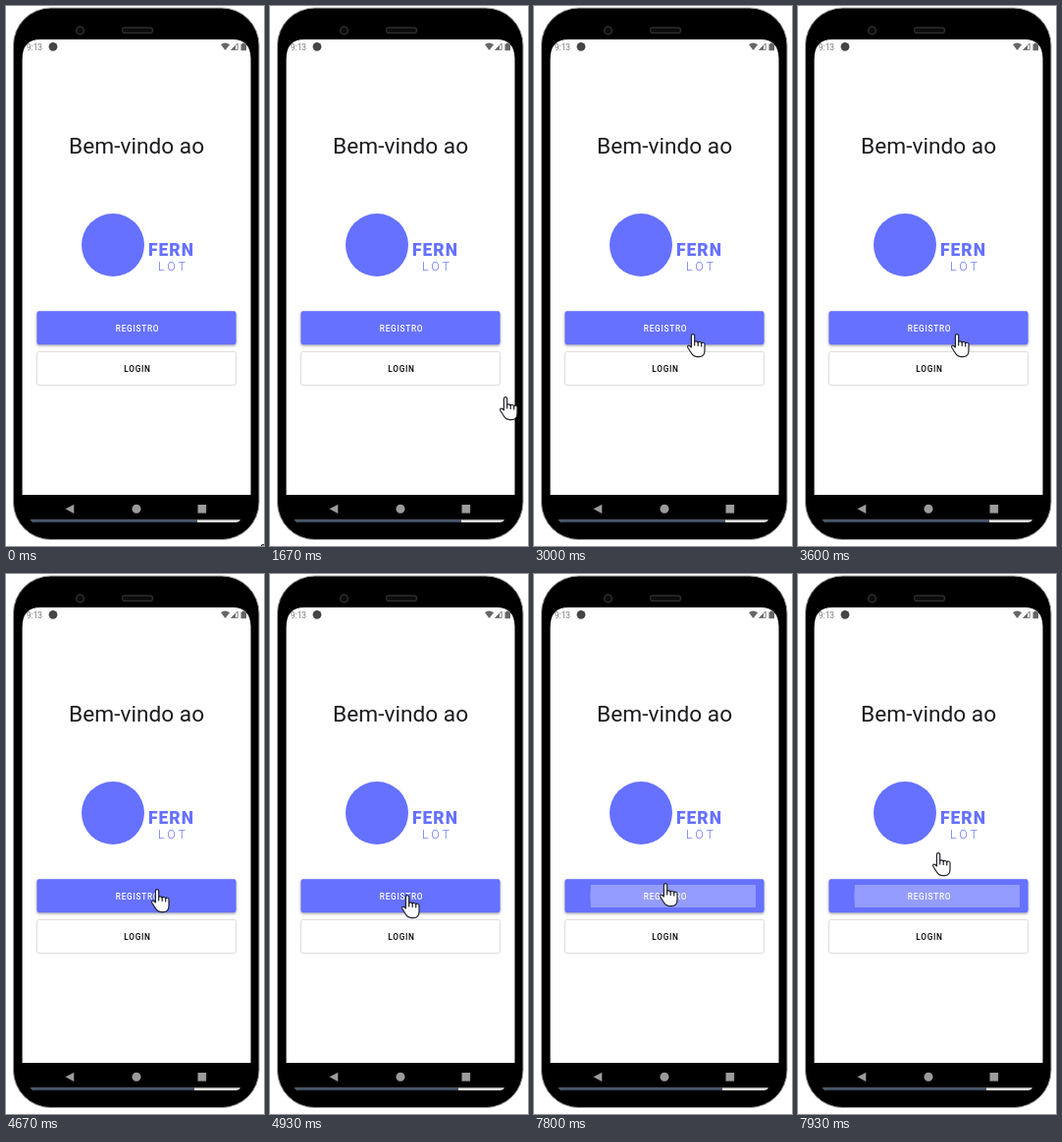
These frames come from a looping animation (263x549 px, 8 s). An HTML page:

```html
<!DOCTYPE html>
<html lang="pt">
<head>
<meta charset="utf-8">
<style>
html, body { margin: 0; width: 100%; height: 100%; overflow: hidden; background: #fff }
svg { display: block; font-family: Roboto, sans-serif }
.button { font-size: 8.26px; font-weight: 500; letter-spacing: .74px; text-anchor: middle }
.shadow { filter: drop-shadow(0 1.3px 1.4px #0006) }
</style>
</head>
<body>
<svg width="263" height="549" viewBox="0 0 263 549">
  <clipPath id="screen"><path d="M16.6 497V54Q16.6 34 35 34H231Q249.5 34 249.5 54V497Z"/></clipPath>

  <!-- phone -->
  <rect x="7.5" y="2" width="250.5" height="540.5" rx="38" stroke="#a0a0a0"/>
  <circle cx="75.5" cy="25" r="4" fill="#0c0c0c" stroke="#2e2e2e" stroke-width="1.5"/>
  <rect x="118.5" y="22" width="31" height="5.4" rx="2.7" fill="#0c0c0c" stroke="#2e2e2e" stroke-width="1.3"/>

  <g clip-path="url(#screen)">
    <rect width="263" height="549" fill="#fff"/>

    <!-- status bar -->
    <text x="21" y="44.5" font-size="8.3" fill="#777">9:13</text>
    <circle cx="48" cy="41.3" r="4.4" fill="#444"/>
    <g fill="#666">
      <path d="M219 39.3Q223.5 35.7 228 39.3L223.5 45Z"/>
      <path d="M229.6 44.6H236.2V38Z" fill="none" stroke="#666" stroke-width=".8"/>
      <path d="M229.6 44.6H234V40.2Z"/>
      <path d="M239.5 38.5H241V37.5H243.5V38.5H245V45.3H239.5Z"/>
    </g>

    <!-- content -->
    <text x="133.1" y="149.5" font-size="22.7" fill="#1c1b1f" text-anchor="middle">Bem-vindo ao</text>
    <g fill="#6671ff">
      <circle cx="109" cy="243" r="32"/>
      <text x="145" y="254" font-size="17.5" font-weight="900" letter-spacing="1">FERN</text>
      <text x="155" y="269" font-size="12.5" font-weight="300" letter-spacing="3">LOT</text>
      <rect class="shadow" x="31.5" y="310.3" width="203" height="34" rx="2.2"/>
    </g>
    <text class="button" x="134" y="331" fill="#fff">REGISTRO</text>
    <path id="ripple" d="M58 316H226V339H58Q56.5 328 58 316Z" fill="#fff" opacity=".3"/>
    <rect x="31.5" y="351.5" width="203" height="34" rx="2.2" fill="#fff" stroke="#dcdcdc"/>
    <text class="button" x="134" y="372" fill="#000">LOGIN</text>
  </g>

  <!-- navigation bar -->
  <g fill="#9b9b9b">
    <path d="M60.5 511.3L69.3 506.7V515.9Z"/>
    <circle cx="133" cy="511.2" r="4.5"/>
    <rect x="195.5" y="507" width="8.6" height="8.6"/>
  </g>
  <path d="M25 522.3H239Q238 525 235 525H29Q26 525 25 522.3Z" fill="#dcdcdc"/>
  <path id="progress" fill="#3e4d62"/>

  <g id="hand" fill="#fff" stroke="#20222e" stroke-width="1.2" stroke-linejoin="round" stroke-linecap="round">
    <path d="M6 .7C4.9 .7 4.4 1.5 4.4 2.5V14L2.8 12.5C1.4 11.5 0 12.6 .8 14.2L4.6 20.3C5.9 22.5 7.6 23.6 10 23.6H12.4C16 23.6 18 20.9 18 17V10.8C18 8.9 15 8.7 14.7 10.2C14.6 8.2 11.5 7.9 11.2 9.4C11 7.7 7.9 7.2 7.7 8.6V2.5C7.7 1.5 7.1 .7 6 .7Z"/>
    <path d="M7.7 8.6V12M11.2 9.4V12.5M14.7 10.2V13" fill="none"/>
  </g>
</svg>
<script>
const FPS = 15, LOOP = 8000;
const get = id => document.getElementById(id);
const hand = get('hand'), ripple = get('ripple'), progress = get('progress');

// pointer path: [step, x, y]
const path = [
  [0, 256, 547], [13, 256, 547], [17, 239, 457], [21, 227, 402], [24, 227, 402],
  [25, 234, 397], [32, 171, 349], [36, 156, 333], [66, 156, 333],
  [70, 148, 320], [77, 123, 330], [116, 123, 330], [119, 137, 283]
];

function pointer(step) {
  const i = path.findIndex(p => p[0] >= step);
  if (i < 1) return path[0].slice(1);
  const [s0, x0, y0] = path[i - 1], [s1, x1, y1] = path[i];
  const k = (step - s0) / (s1 - s0);
  return [x0 + (x1 - x0) * k, y0 + (y1 - y0) * k];
}

function draw(now) {
  const step = Math.min(119, Math.floor((now % LOOP + 4) * FPS / 1000));
  const end = step < 67 ? 195 : 192;
  hand.setAttribute('transform', `translate(${pointer(step).map(Math.round)})`);
  progress.setAttribute('d', `M25 522.3H${end}V525H29Q26 525 25 522.3Z`);
  ripple.style.visibility = step < 83 ? 'hidden' : 'visible';
}

const start = performance.now();
function tick() {
  draw(performance.now() - start);
  requestAnimationFrame(tick);
}
tick();
</script>
</body>
</html>
```
